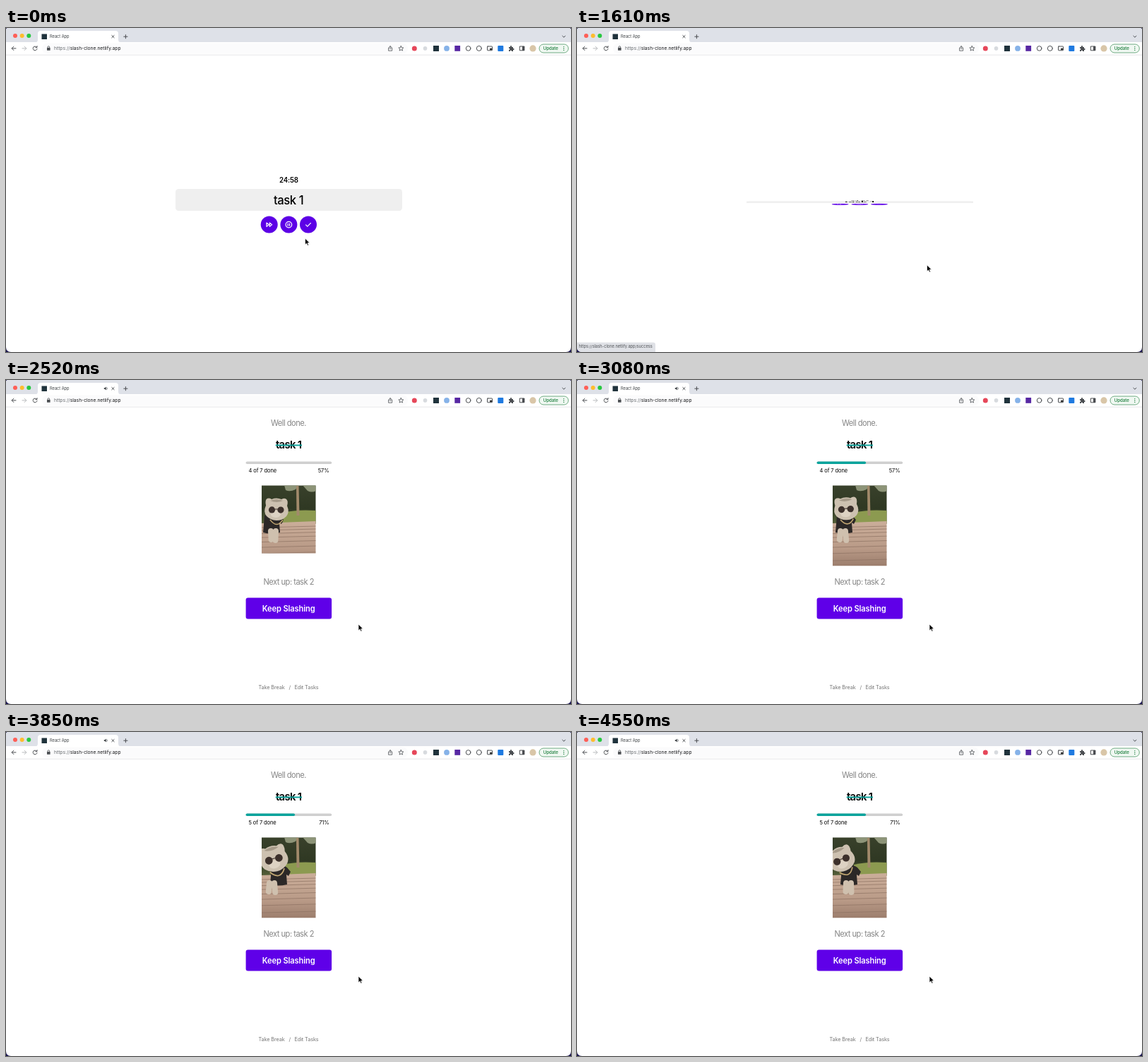
An HTML page for the animation above (4.62 s loop, 800x459 px).

```html
<!DOCTYPE html>
<html lang="en">
<head>
<meta charset="utf-8">
<title>Task timer</title>
<style>
html, body { margin: 0; width: 100%; height: 100%; overflow: hidden; background: #17124f; }
svg { display: block; width: 800px; height: 459px; }
text { font-family: Inter, "Open Sans", sans-serif; white-space: pre; }
.mid { text-anchor: middle; }
.chrome text { fill: #3c4043; }
.line { fill: none; stroke: #4a4d51; stroke-width: 1; stroke-linecap: round; stroke-linejoin: round; }
.white { fill: none; stroke: #fff; stroke-width: 1.2; stroke-linecap: round; stroke-linejoin: round; }
.btn { fill: #5c00e6; }
.btn.hot { fill: #742ff8; }
.soft { fill: #858585; font-size: 11.1px; letter-spacing: -.5px; }
.small { font-size: 7.5px; letter-spacing: -.1px; }
.link { fill: #757575; font-size: 7.3px; letter-spacing: -.1px; }
</style>
</head>
<body>
<svg viewBox="0 0 800 459">
  <defs>
    <clipPath id="win"><path d="M0 3q0-3 3-3h794q3 0 3 3v449q0 7-7 7H7q-7 0-7-7z"/></clipPath>
    <clipPath id="rows"><rect id="shown" x="362" y="149.5" width="76.5" height="114"/></clipPath>
    <linearGradient id="deck" x1="0" y1="0" x2="0" y2="1">
      <stop offset="0" stop-color="#cbae9a"/><stop offset=".6" stop-color="#b99a87"/><stop offset="1" stop-color="#9b7d6c"/>
    </linearGradient>
    <linearGradient id="wood" x1="0" y1="0" x2="0" y2="1">
      <stop offset="0" stop-color="#39412b"/><stop offset=".6" stop-color="#2f3823"/><stop offset="1" stop-color="#56613a"/>
    </linearGradient>
  </defs>
  <g clip-path="url(#win)">
    <rect width="800" height="459" fill="#fff"/>

    <g class="chrome">
      <rect width="800" height="20" fill="#dee1e8"/>
      <circle cx="13" cy="11" r="3" fill="#fe5f57"/>
      <circle cx="22.7" cy="11" r="3" fill="#febc2e"/>
      <circle cx="32.3" cy="11" r="3" fill="#28c840"/>
      <path d="M41 20.5q4 0 4-4V8q0-4 4-4h106q4 0 4 4v8.500q0 4 4 4z" fill="#fff"/>
      <rect x="50.500" y="8.500" width="7.500" height="7.500" fill="#20333c"/>
      <text x="62" y="14.200" font-size="5.65">React App</text>
      <g id="sound"><path d="M138.800 11h1.300l1.700-1.500v5l-1.700-1.500h-1.300z" fill="#4a4d51"/>
        <path class="line" style="stroke-width:.7" d="M143 10.700q1 1.300 0 2.600"/></g>
      <path class="line" d="M149.800 10.500l3.300 3.300m0-3.300l-3.300 3.300M166.800 12.200h5.200m-2.600-2.600v5.200M787.900 11.200l2 2 2-2"/>
      <path d="M0 38.200h800" stroke="#dfe1e4" stroke-width=".8"/>
      <rect x="51" y="21.500" width="518" height="15" rx="7.500" fill="#fbfbfc"/>
      <path class="line" d="M14 28.900H8.200m2.700-2.700l-2.700 2.700 2.700 2.700"/>
      <path class="line" style="stroke:#b9bbbe" d="M23 28.900h5.800m-2.700-2.700l2.700 2.700-2.700 2.700"/>
      <path class="line" d="M43.500 27.200a2.900 2.900 0 1 0 .5 2.300M44 25.600v2h-2"/>
      <rect x="58" y="28" width="4.600" height="3.700" rx=".5" fill="#4a4d51"/>
      <path class="line" style="stroke-width:.8" d="M59 28v-1a1.300 1.300 0 0 1 2.600 0v1"/>
      <text x="68" y="31.300" font-size="6.7"><tspan fill="#666a6e">https://</tspan><tspan fill="#17181a">slash-clone.netlify.app</tspan></text>
      <path class="line" style="stroke-width:.8" d="M542.800 28h-1.200v4.200h5V28h-1.200M544.100 30v-4.300m-1.400 1.300l1.400-1.400 1.400 1.400"/>
      <path class="line" style="stroke-width:.8" d="M559.300 25.500l1 2.300 2.500.2-1.900 1.600.6 2.500-2.200-1.300-2.200 1.300.6-2.500-1.900-1.600 2.500-.2z"/>
      <circle cx="578.300" cy="28.900" r="3.500" fill="#e6475a"/>
      <circle cx="593.500" cy="28.900" r="2.800" fill="#d7dade"/>
      <rect x="605" y="25" width="8" height="8" fill="#20333c"/>
      <circle cx="624" cy="28.900" r="3.900" fill="#86b2e8"/>
      <rect x="635.300" y="25" width="7.800" height="7.800" fill="#5727a3"/>
      <circle class="line" cx="654.600" cy="28.900" r="3.300"/>
      <circle class="line" cx="669.800" cy="28.900" r="3.500"/>
      <rect class="line" x="681.500" y="26" width="7" height="5.800" rx=".6"/>
      <rect x="685" y="28.700" width="3" height="2.500" fill="#333"/>
      <rect x="696.300" y="25" width="8" height="8" rx="1" fill="#1f7ae0"/>
      <path d="M712 27h2q-.5-1.900 1-1.900t1 1.900h2v2q1.600-.4 1.600 1t-1.600 1v2h-2q0-1.500-1.200-1.500T713.800 33H712v-2q1.400 0 1.400-1.100T712 28.800z" fill="#4a4d51"/>
      <rect class="line" x="727.700" y="26" width="6.200" height="5.800"/>
      <rect x="731" y="26" width="3" height="6" fill="#4a4d51"/>
      <circle cx="746" cy="28.900" r="4.600" fill="#d9c6a8"/>
      <rect x="755" y="23" width="41.300" height="12" rx="6" fill="#f0f8f2" stroke="#4b9662" stroke-width=".8"/>
      <text x="760.800" y="31.200" font-size="6.1" font-weight="500" style="fill:#177a38">Update</text>
      <g fill="#177a38"><circle cx="789.800" cy="26.600" r=".7"/><circle cx="789.800" cy="29" r=".7"/><circle cx="789.800" cy="31.400" r=".7"/></g>
    </g>

    <g id="timer">
      <text id="clock" class="mid" x="400.400" y="219.400" font-size="9.700" font-weight="600" letter-spacing="-.2"></text>
      <rect x="240" y="228" width="321" height="31" rx="4.500" fill="#efefef"/>
      <text class="mid" x="400" y="250" font-size="16.700" font-weight="500" letter-spacing="-.45">task 1</text>
      <circle class="btn" cx="372.700" cy="278.600" r="12"/>
      <circle class="btn" cx="400.400" cy="278.600" r="12"/>
      <circle class="btn" cx="428" cy="278.600" r="12"/>
      <path class="white" d="M369 275.900l3.400 2.700-3.400 2.700zM373.300 275.900l3.400 2.700-3.400 2.700z"/>
      <circle class="white" cx="400.400" cy="278.600" r="4.300"/>
      <path class="white" d="M399.200 277v3.200m2.400-3.200v3.200M424.600 278.900l2.200 2.200 4.600-4.700"/>
    </g>

    <g id="success">
      <text class="mid soft" x="400" y="64.900">Well done.</text>
      <text class="mid" x="400.200" y="97" font-size="14.800" font-weight="600" letter-spacing="-.65">task 1</text>
      <rect id="strike" x="381.700" y="91.500" height="1.900" fill="#0aa39c"/>
      <rect x="339.600" y="115.400" width="121.600" height="3.700" rx="1.800" fill="#cfcfcf"/>
      <rect id="bar" x="339.600" y="115.400" height="3.700" rx="1.800" fill="#0aa39c"/>
      <text id="count" class="small" x="343.500" y="131.300"></text>
      <text id="share" class="small" x="457.500" y="131.300" text-anchor="end"></text>
      <g id="photo" clip-path="url(#rows)">
        <rect x="362" y="149" width="77" height="55" fill="url(#wood)"/>
        <path d="M394 149h20l-4 6q-8 4-14 1zM420 149h19v8q-6 3-12 0z" fill="#8d9478"/>
        <path d="M392 188q20-5 47-3v18h-47z" fill="#8c9a50"/>
        <path d="M411 150h3.500l1 42h-4z" fill="#a28a6b"/>
        <path d="M362 203l77-3v64h-77z" fill="url(#deck)"/>
        <path id="planks" fill="none" stroke="#8d7262" stroke-width=".7"/>
        <path id="coat" fill="#2c2827"/>
        <path id="legs" fill="none" stroke="#cfc0ae" stroke-width="8" stroke-linecap="round"/>
        <g id="head">
          <path d="M-15-4q-2-8 2-10 3-1 6 1 7-3 14 0 3-2 6-1 4 2 2 10 4 9-1 15-6 6-14 6t-14-6q-5-6-1-15z" fill="#cdc1b0"/>
          <path d="M-9-11q9-4 18 0-9 4-18 0z" fill="#a69a89"/>
          <ellipse cx="-1" cy="8" rx="7" ry="5" fill="#ddd2c3"/>
          <circle cx="-6.500" cy="2" r="4.600" fill="#3c302b"/>
          <circle cx="6" cy="2" r="4.600" fill="#3c302b"/>
          <path d="M-2 1h4" stroke="#3c302b"/>
          <path d="M-9 16q10 13 18 0" fill="none" stroke="#c4a873" stroke-width="1.500"/>
        </g>
      </g>
      <text class="mid soft" x="400.200" y="290.200">Next up: task 2</text>
      <rect x="339.600" y="308.500" width="121.500" height="30" rx="3" fill="#5f00e8"/>
      <text class="mid" x="400.200" y="327.800" font-size="11.100" font-weight="600" letter-spacing="-.1" fill="#fff">Keep Slashing</text>
      <text class="link" x="357.400" y="438">Take Break</text>
      <text class="link" x="400.400" y="438">/</text>
      <text class="link" x="408.500" y="438">Edit Tasks</text>
    </g>

    <g id="status">
      <path d="M0 445.500h108q3 0 3 3V459H0z" fill="#dfe1e6"/>
      <text x="2.400" y="453.300" font-size="5.680" fill="#4d5054">https://slash-clone.netlify.app/success</text>
    </g>
  </g>
  <path id="arrow" d="M0 0v9l2.100-1.900 1.400 3.100 1.500-.7-1.300-3H6.500z" fill="#000" stroke="#fff" stroke-width=".7"/>
  <path id="hand" d="M-1.200 5.800V.8q0-1 1-1t1 1v3.400l3 .5q1.500.3 1.300 1.700l-.6 3-.6 1.400H-.4L-3.300 6.300q-.5-1.200.6-1.200.8 0 1.500.7z" fill="#fff" stroke="#222" stroke-width=".8"/>
</svg>
<script>
const LOOP = 4620, STEP = 70, MIDDLE = 247;
const $ = id => document.getElementById(id);
const set = (id, name, value) => $(id).setAttribute(name, value);
const show = (id, on) => set(id, "visibility", on ? "visible" : "hidden");
const clamp = v => Math.min(1, Math.max(0, v));
const smooth = v => v * v * (3 - 2 * v);
const span = (t, from, to) => clamp((t - from) / (to - from));

// rows: time, then the values reached at that time
const pointer = [
  [0, 423.5, 298], [210, 424, 297], [560, 430, 287], [700, 430.6, 286],
  [1120, 430.6, 286], [1540, 492, 333], [1610, 495.5, 335.8], [1960, 499, 346]
];
// head x, head y, head scale, head tilt, coat shift, feet x
const walk = [
  [2200, 384, 182, 1, 2, 0, 379],
  [2520, 383, 182, 1, 0, 0, 378],
  [3080, 381, 181, 1.02, -3, 2, 376],
  [3850, 379, 178, 1.17, -14, 10, 376],
  [4550, 374, 179, 1.1, -22, 9, 384]
];

function at(table, t) {
  let i = 1;
  while (i < table.length - 1 && t > table[i][0]) i++;
  const a = table[i - 1], b = table[i], k = smooth(span(t, a[0], b[0]));
  return a.slice(1).map((v, n) => v + (b[n + 1] - v) * k);
}

function fold(id, scale) {
  show(id, scale > 0.002);
  set(id, "transform", `translate(0 ${MIDDLE * (1 - scale)}) scale(1 ${scale})`);
}

function drawCat(t) {
  const [x, y, size, tilt, shift, feet] = at(walk, t);
  const sway = Math.sin(t / 130) * 1.2;
  set("head", "transform", `translate(${x} ${y}) rotate(${tilt + sway}) scale(${size})`);
  const c = 379 + shift;
  set("coat", "d", `M${c - 13} 192q13-7 22 0l5 6-3 6-3-2 1 14q-13 3-24 0z`);
  set("legs", "d", `M${feet - 3} 214L${feet - 3 + sway} 226M${feet + 4} 214L${feet + 4 - sway} 227`);
}

function render(t) {
  const leave = smooth(span(t, 1200, 1700));
  const enter = smooth(span(t, 1700, 2200));
  fold("timer", 1 - leave);
  fold("success", enter);
  $("clock").textContent = t < 490 ? "24:58" : "24:57";

  const [x, y] = at(pointer, t);
  let over = false;
  document.querySelectorAll(".btn").forEach(b => {
    const hot = leave < 0.5 && Math.hypot(x - b.getAttribute("cx"), y - b.getAttribute("cy")) < 12;
    b.classList.toggle("hot", hot);
    over = over || hot;
  });
  show("hand", over);
  show("arrow", !over);
  for (const id of ["hand", "arrow"]) set(id, "transform", `translate(${x} ${y})`);
  show("status", t >= 560 && t < 1820);
  show("sound", t >= 2170);

  set("strike", "width", 37.3 * smooth(span(t, 2030, 2450)));
  set("bar", "width", 69.5 * smooth(span(t, 2520, 3080)));
  const done = t < 3500 ? 4 : 5;
  $("count").textContent = `${done} of 7 done`;
  $("share").textContent = Math.round(done / 7 * 100) + "%";
  set("shown", "height", 113.7 * span(t, 2240, 2572));
  drawCat(t);
}

let planks = "";
for (let y = 208, gap = 4; y < 264; y += gap, gap *= 1.17) planks += `M362 ${y + 1}L439 ${y - 1}`;
set("planks", "d", planks);

const start = performance.now();
function tick() {
  const t = (performance.now() - start) % LOOP;
  render(Math.floor(t / STEP) * STEP);
  requestAnimationFrame(tick);
}
tick();
</script>
</body>
</html>
```
